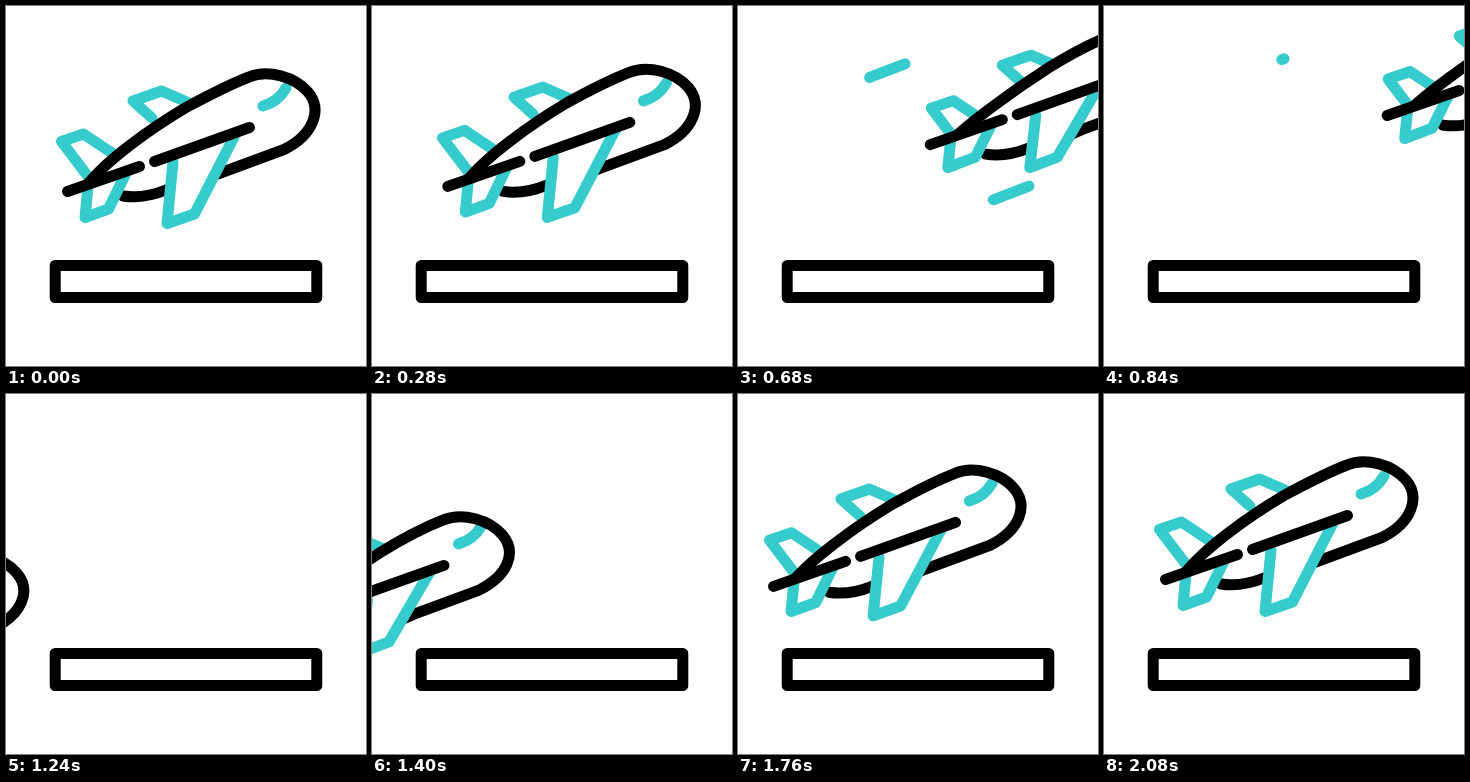
Animation of 360 by 360 pixels, one loop 2.16 s. Source, as an HTML page:

```html
<!DOCTYPE html>
<html lang="en">
<head>
<meta charset="utf-8">
<title>Take-off</title>
<style>
  html, body { margin: 0; width: 100%; height: 100%; overflow: hidden; background: #fff; }
  svg { display: block; width: 100vw; height: 100vh; }
  path { stroke: #000; stroke-width: 11; stroke-linecap: round; stroke-linejoin: round; fill: none; }
  .teal { stroke: #36cbcc; }
  .solid { fill: #fff; }
  .mask { fill: #fff; stroke: none; }
</style>
</head>
<body>
<svg viewBox="0 0 360 360">
  <path d="M49.2 259.5H310.8V291.5H49.2Z"/>
  <path id="highStreak" class="teal"/>
  <path id="lowStreak" class="teal"/>
  <g id="plane">
    <path id="farWing" class="teal solid" d="M146 112L127 95L155.5 85L190 100"/>
    <path id="farTail" class="teal solid" d="M84 173L55.5 135.5L77.5 128L112 151"/>
    <path class="mask body"/>
    <path id="windscreen" class="teal" d="M257 100Q272 96 280 82"/>
    <path class="body"/>
    <path id="wing" class="teal solid"/>
    <path id="tail" class="teal solid"/>
    <path id="edges" d="M61.5 185.5L133.5 160.5M148.5 155.5L243.5 121.5"/>
  </g>
</svg>
<script>
  const LOOP = 2160;
  const $ = id => document.getElementById(id);
  const bodies = document.querySelectorAll('.body');
  const clamp = v => Math.min(1, Math.max(0, v));
  const ramp = (t, from, to) => clamp((t - from) / (to - from));
  const smooth = v => v * v * (3 - 2 * v);
  const move = (el, x, y) => el.setAttribute('transform', `translate(${x} ${y})`);

  // Each point: x, y, and its shift when the plane is fully rolled.
  const wing = [[167, 156, 0, -5], [161, 217.5, 0, -14], [188.5, 208, 0, -15], [230, 127, 0, -5]];
  const tail = [[82, 180, 0, -5], [79, 211.5, 0, -8], [102.5, 203, 4, -10], [120, 167, 2, -5]];

  function bend(id, points, roll) {
    const list = points.map(([x, y, dx, dy]) => `${x + dx * roll} ${y + dy * roll}`);
    $(id).setAttribute('d', 'M' + list.join('L'));
  }

  // Rolling flattens the back and the belly.
  function drawBody(roll) {
    const back = 4 * roll, belly = -2 * roll;
    const d = `M82 ${178 - roll}C100 ${155 + back} 142 ${124 + back} 180 ${101.5 + back / 2}` +
      'C205 88 225 78 243 71C262 63 289 71 302 86' +
      `C317 104 307 ${129 + belly} 278 ${143.5 + belly}L213 ${167.5 + belly}` +
      'C190 176 175 179 160 184C145 190 130 192 117 190';
    bodies.forEach(el => el.setAttribute('d', d));
  }

  function streak(id, x, y, length, head, tailEnd) {
    const el = $(id);
    const at = k => `${x + length * k} ${y - 0.385 * length * k}`;
    el.style.display = head > 0 && tailEnd < 1 ? '' : 'none';
    el.setAttribute('d', `M${at(tailEnd)}L${at(head)}`);
  }

  function offset(t) {
    return t < 1100
      ? 221 * (t / 840) ** 2.5
      : -292 * (Math.max(0, 2080 - t) / 840) ** 2.5;
  }

  function draw(t) {
    const dx = offset(t);
    const roll = smooth(t < 1100 ? ramp(t, 220, 520) : 1 - ramp(t, 1560, 1870));
    move($('plane'), dx, -0.32 * dx);
    move($('farWing'), 6.5 * roll, 6 * roll);
    move($('farTail'), 7 * roll, 8.5 * roll);
    move($('windscreen'), roll, -5 * roll);
    move($('edges'), 0, -5 * roll);
    drawBody(roll);
    bend('wing', wing, roll);
    bend('tail', tail, roll);
    streak('highStreak', 95, 85.5, 85, smooth(ramp(t, 440, 760)), smooth(ramp(t, 520, 875)));
    streak('lowStreak', 199, 215.5, 92, smooth(ramp(t, 360, 680)), smooth(ramp(t, 520, 800)));
  }

  const start = performance.now();
  function frame() {
    draw((performance.now() - start) % LOOP);
    requestAnimationFrame(frame);
  }
  frame();
</script>
</body>
</html>
```
